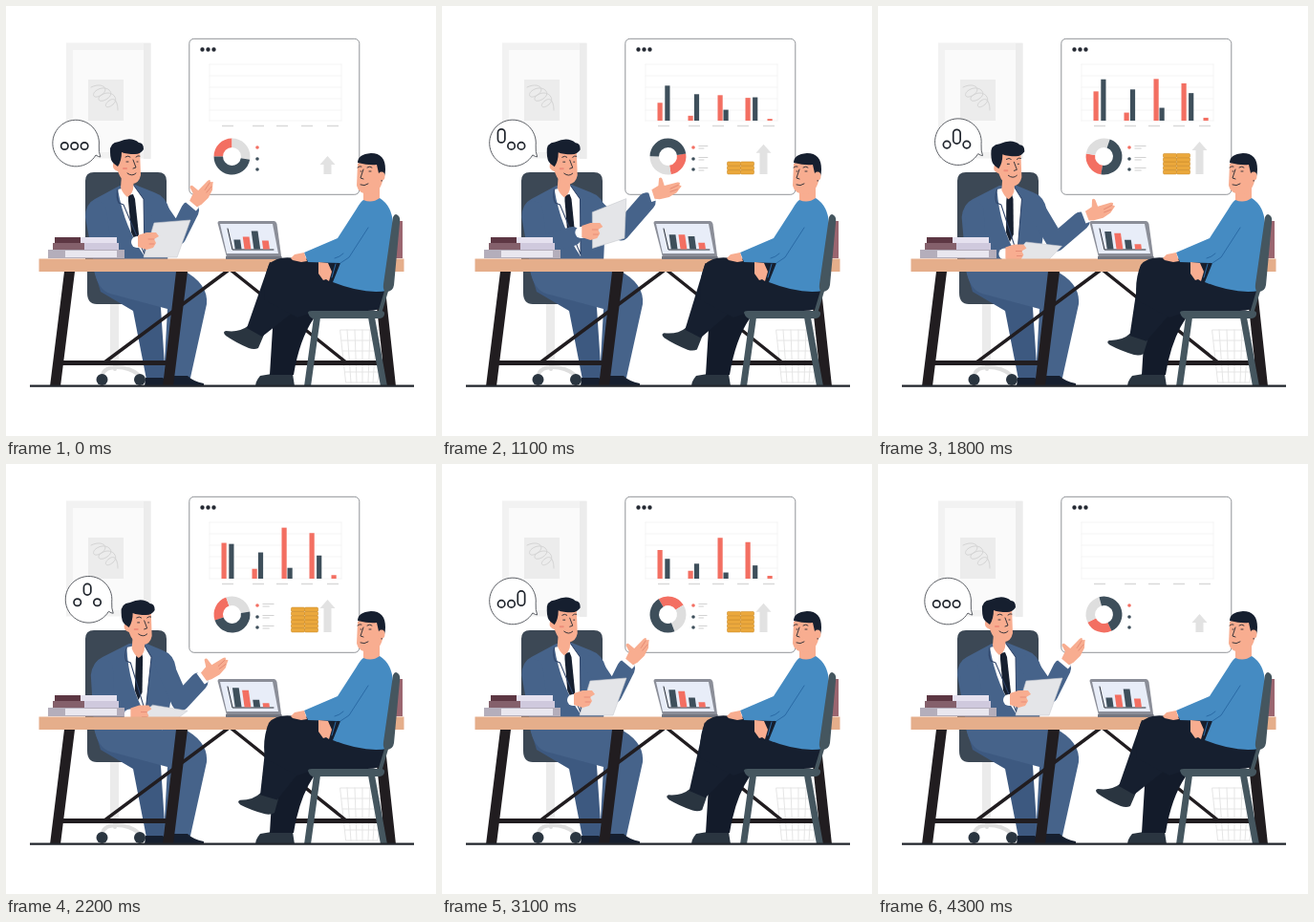
These frames come from a looping animation (450 px wide and 450 px high, 4400 ms). An HTML page:

```html
<!DOCTYPE html>
<html lang="en">
<head>
<meta charset="utf-8">
<title>Business meeting</title>
<style>
html, body { margin: 0; width: 100%; height: 100%; overflow: hidden; background: #fff }
svg { display: block; width: 100vw; height: 100vh }
.line { fill: none; stroke-linecap: round; stroke-linejoin: round }
.ink { stroke: #252a33 }
.suit { stroke: #46638a }
.skin { fill: #f8ad90 }
.navy { fill: #161f2f }
.shoe { fill: #2a3540 }
.red { fill: #f36f62 }
.dark { fill: #3e4f5b }
.steel { fill: #45565f }
.table { fill: #211d20 }
</style>
</head>
<body>
<svg viewBox="0 0 450 450">
  <!-- wall picture -->
  <path fill="#f2f2f2" d="M63 38.500h88.500v121H63z"/>
  <path fill="#fafafa" d="M70 46h74v107H70z"/>
  <path fill="#ececec" d="M144 39h7.500v121H144zM86 77h37v43H86z"/>
  <path class="line" stroke="#d4d4d4" d="M89 85c12-6 20 2 11 8s-12-2-3-6 18 4 9 10-13-1-4-5 17 5 10 11-11 1-4-4 9 4 9 10"/>

  <!-- board -->
  <rect x="191.800" y="34.300" width="178" height="163" rx="5" fill="#fff" stroke="#85888d" stroke-width=".9"/>
  <path class="line ink" stroke-width="4.400" d="M205.500 45.500h0M211.500 45.500h0M217.500 45.500h0"/>
  <path class="line" stroke="#f3f3f3" stroke-width=".8" d="M213 61v59M351 61v59M213 61h138M213 73h138M213 85h138M213 97h138M213 109h138M213 120h138"/>
  <path stroke="#d9d9d9" stroke-width="1.400" d="M226 125.500h12M258 125.500h12M283 125.500h12M309 125.500h12M336 125.500h12"/>
  <g id="bars"></g>
  <g id="donut" fill="none" stroke-width="9.500">
    <circle r="14.200" pathLength="360" stroke="#f36f62" stroke-dasharray="90 270" transform="rotate(180)"/>
    <circle r="14.200" pathLength="360" stroke="#dedede" stroke-dasharray="100 260" transform="rotate(-90)"/>
    <circle r="14.200" pathLength="360" stroke="#3e4f5b" stroke-dasharray="170 190" transform="rotate(10)"/>
  </g>
  <circle class="red" cx="263" cy="148" r="1.800"/><circle class="dark" cx="263" cy="160" r="1.800"/><circle class="dark" cx="263" cy="171" r="1.800"/>
  <path id="legend" stroke="#d2d2d2" stroke-width="1.200"/>
  <path id="arrow" fill="#e2e2e2"/>
  <g id="coins" fill="#eba83c" stroke="#cb8c2b" stroke-width=".6"></g>

  <!-- office chair -->
  <path fill="#ebebeb" d="M109 310h9v62h-9z"/>
  <path class="line" stroke="#dedede" stroke-width="4" d="M114 372v8M101 386q2-8 15-8t23 8"/>
  <g class="shoe"><circle cx="100.500" cy="391" r="6"/><circle cx="140" cy="391" r="6"/></g>
  <path fill="#3c4855" d="M83 183q0-9 9-9h67q9 0 9 9v90H83zM85 276h60v36H95q-10 0-10-12z"/>

  <!-- presenter: legs -->
  <path fill="#3d5980" d="M92 276h60l10 40 5 75h-20l-14-72-34-20z"/>
  <path fill="#46638a" d="M92 276h92q28 14 26 36l-17 77h-28l4-72-60-16q-13-4-17-25z"/>
  <path class="navy" d="M146 389h18l9 9h-28zM173 387h17q6 6 17 8v3h-35z"/>

  <!-- presenter: body -->
  <g id="torso">
    <path fill="#46638a" d="M119 188l16-1 20 8q12 4 16 18l-2 57H92l-9-49q0-14 10-19z"/>
    <path fill="#fff" d="M117 192l17-4 10 14 1 60q-21-30-28-70z"/>
    <path class="navy" d="M128 198l5-1 2 5 4 37-3 8-5-10-3-33z"/>
    <path class="line" stroke="#2e4368" stroke-width="1" d="M117 192q-2 8 1 14l5 2 22 52M134 188l10 14 1 58M100 219l5 34"/>
  </g>
  <g id="head">
    <path class="skin" d="M121 177l13 3-1 12q-2 6-6 8-5-4-7-10z"/>
    <path class="skin" d="M116 153q12-8 24-3l1 27q-2 10-11 9-9-1-13-13-6-2-5-7t5-4z"/>
    <path class="navy" d="M117 168l-4-3q-4-3-4-12-1-10 9-11 13-6 21 1 5 0 5 7-3 5-9 5-9 0-14-2 0 9-4 15z"/>
    <path class="line ink" stroke-width=".9" d="M125 158q3-2 5 0M136 158q2-2 4-1M126 163h2M137 163h1M133 161l3 8-3 1M127 175q5 4 9 0"/>
    <path class="line" stroke="#ee8d7a" stroke-width="2" d="M123 170h3"/>
  </g>
  <path id="armL" class="line suit" stroke-width="20"/>
  <path id="armR" class="line suit" stroke-width="19"/>
  <path id="cuffL" class="line" stroke="#fff" stroke-width="12"/>
  <g id="paperHand">
    <path id="paper" fill="#e4e5e8" stroke="#c9cbd0" stroke-width=".6" d="M7-19L45-22 31 17-4 17z"/>
    <path class="skin" d="M-10-6l9-3 10 0 3 4-5 3 2 4-3 5-7 2-9-3z"/>
    <path class="line" stroke="#df806d" stroke-width=".7" d="M1-2h6M2 3h5"/>
  </g>
  <g id="openHand">
    <path fill="#fff" d="M-4-7h5V7h-5z"/>
    <path class="skin" d="M0-5l8-2 3-7q3-1 3 2l0 7 14 1q4 1 1 3l2 2-3 2-4 3-9 2-10-1-5-2z"/>
    <path class="line" stroke="#df806d" stroke-width=".7" d="M19 0l9-1M18 3l8 0"/>
  </g>

  <!-- speech bubble -->
  <g id="bubble">
    <path fill="#fff" stroke="#4b4f55" stroke-width=".9" d="M94 156a24.300 24.300 0 1 1 3.300-10q-.5 7 1.500 12-2 0-4.800-2z"/>
    <g id="dots" fill="none" stroke="#20252d" stroke-width="1.700"></g>
  </g>

  <!-- books -->
  <path fill="#5d3743" d="M51 242h27v6H51z"/><path fill="#84606b" d="M49 248h33v7H49z"/>
  <path fill="#e5e1ef" d="M78 242h38v6H78z"/><path fill="#cfc9dd" d="M82 248h36v7H82z"/>
  <path fill="#b4aebb" d="M44 255h80v9H44z"/><path fill="#e9e7ef" d="M62 256h54v7H62z"/>
  <path fill="#9b6670" d="M407 225h8v39h-8z"/>

  <!-- waste basket -->
  <path class="line" stroke="#e3e3e3" stroke-width=".9" d="M350 339h45l-6 55h-33zM357 339l4 55M365 339l2 55M373 339v55M381 339l-2 55M388 339l-4 55M351 350h43M352 361h40M354 372h37M355 383h35"/>

  <!-- table -->
  <path class="line" stroke="#211d20" stroke-width="3.500" d="M232 277L103 373M236 277l120 96"/>
  <path class="table" d="M61 278h11L57 398H46zM178 278h12l-15 120h-11zM384 278h11l13 120h-11zM57 371h111v5H57zM302 371h96v5h-96z"/>
  <path fill="#e5ae8b" d="M34.500 264.500h382v13.500h-382z"/>

  <!-- laptop -->
  <path fill="#8b8e98" d="M221.500 227q0-2 2-2h57q2 0 3 3l5 37h-57z"/>
  <path fill="#e8edf8" d="M224 228h55l6 31h-54z"/>
  <path fill="#737680" d="M230 262h58.500v3H230z"/>
  <path class="line ink" stroke-width="1" d="M232 233l5 22h43"/>
  <g id="screen"></g>

  <!-- guest -->
  <path class="shoe" d="M266 387l12-2h22l2 13h-41q0-5 5-11z"/>
  <path fill="#131b2a" d="M284 304l48-9-10 32q-15 22-21 59h-25l4-65z"/>
  <g id="shin">
    <path id="foot" class="shoe" d="M230 340q14 2 23-5l17 9-6 14q-4 2-10 0-14-6-24-13-4-4 0-5z"/>
    <path class="navy" d="M276 268l37 12-2 32-43 34-16-9z"/>
  </g>
  <path class="navy" d="M275 271q8-10 28-7l45 2 48 27v20q-4 6-18 6h-52l-21 7-34-18q-3-20 4-37z"/>
  <path fill="#458bc2" d="M374 203l17-2q13 8 14 27l-6 70q-24 4-57-9l8-20-34-1-4-10 35-15 20-31q4-7 7-9z"/>
  <path class="line" stroke="#2a6aa5" stroke-width="1" d="M379 232l-20 31-9 6M345 270l-4 14M353 259q-4 4-9 5"/>
  <path class="skin" d="M312 258l3 9-6 1-9-2-2-2 4-4zM327 268l10 1 4 9-3 10-3-2-3 1-5-7z"/>
  <path class="skin" d="M374 188l17-2v15q-8 6-17 2z"/>
  <path class="skin" d="M368 165q12-7 24 0l3 14q-3 17-14 18-12 0-14-9z"/>
  <path class="navy" d="M368 164q0-9 14-10 15 0 15 17 0 8-4 13l-3-9-2-9q-8 1-20-2z"/>
  <ellipse class="skin" cx="393" cy="178" rx="3.500" ry="4.500"/>
  <path class="line ink" stroke-width=".9" d="M368 169q2-2 4-1M378 169q3-2 5 0M371 173h1M380 173h2M374 171l-3 9 3 1M371 187q4 2 8-1"/>

  <!-- guest chair -->
  <path class="line" stroke="#45565f" stroke-width="4" d="M399 295l-9 30"/>
  <path class="steel" d="M405 221q2-5 5-2 3 2 2 8l-6 65q-1 7-8 7-4-1-3-8zM316 321q0-2 4-2h72q5 0 4 4-1 4-6 4h-68q-4 0-6-6zM322 326h7l-10 72h-7zM379 326h7l13 72h-7z"/>
  <path stroke="#20242b" stroke-width="2.400" d="M25 397.600h402"/>
</svg>
<script>
const LOOP = 4400, STEP = 100, END = 4300;
const GESTURE = 2800; // length of the presenter's arm movement
const $ = id => document.getElementById(id);
const set = (id, name, value) => $(id).setAttribute(name, value);
const clamp = x => Math.min(1, Math.max(0, x));
const smooth = (from, to, t) => {
  const p = clamp((t - from) / (to - from));
  return p * p * (3 - 2 * p);
};
// Grows from the start, holds, and shrinks to nothing at END.
const swell = (t, rise, fall) => clamp(Math.min(t / rise, (END - t) / fall));
const slow = t => swell(t, 2350, 1600);
const quick = t => swell(t, 1350, 1600);
const early = t => swell(t, 1350, 2600);

function add(parent, name, attrs) {
  const node = document.createElementNS('http://www.w3.org/2000/svg', name);
  for (const key in attrs) node.setAttribute(key, attrs[key]);
  return $(parent).appendChild(node);
}

const makeBar = (color, x, height) => ({
  height, node: add('bars', 'rect', { x, width: 5.2, class: color }), growth: color === 'red' ? slow : early
});
const bars = [
  ...[40, 11, 57, 51, 4].map((h, i) => makeBar('red', 225.5 + [0, 32, 63, 92, 115][i], h)),
  ...[45, 34, 14, 30].map((h, i) => makeBar('dark', 233.3 + 30.6 * i, h))
];
// resting height and change
const screenBars = [[10, 11], [13, 5], [19, -12], [9, -5]].map(([rest, change], i) => ({
  rest, change,
  node: add('screen', 'rect', {
    x: 240 + 9.8 * i, width: 6.8, class: i % 2 ? 'red' : 'dark', transform: 'translate(-36 0) skewX(8)'
  })
}));
const coins = Array.from({ length: 12 }, (_, i) => add('coins', 'rect', {
  x: 298.5 + 14 * (i % 2), y: 171.6 - 4.3 * (i >> 1), width: 14, height: 4.3, rx: 1.2
}));
const dots = [0, 1, 2].map(i => add('dots', 'rect', { x: 57.6 + 10.4 * i, width: 7.4, rx: 3.7 }));

function setBar(node, base, height) {
  node.setAttribute('y', base - height);
  node.setAttribute('height', height);
}

function drawBoard(t) {
  for (const { node, height, growth } of bars) setBar(node, 120, height * growth(t));
  for (const { node, rest, change } of screenBars) setBar(node, 254.5, rest + change * slow(t));

  // The ring turns steadily, with a short rest in the middle.
  const turn = .155 * (Math.min(t, 2300) + Math.max(0, t - 2700));
  set('donut', 'transform', `translate(236.5 157.5) rotate(${turn})`);

  const length = 12 * quick(t);
  set('legend', 'd', [146.5, 158.5, 169.5].map(y => `M268.500 ${y}h${length}m${-length} 2.500h${length * .6}`).join(''));
  const top = 157 - 15 * quick(t);
  set('arrow', 'd', `M336.500 ${top}l8 9h-4V176h-8V${top + 9}h-4z`);
  const rows = Math.round(6 * slow(t));
  coins.forEach((coin, i) => coin.setAttribute('visibility', (i >> 1) < rows ? 'visible' : 'hidden'));
}

function drawPresenter(t, lean) {
  const skew = -Math.atan(lean / 95) * 180 / Math.PI;
  set('torso', 'transform', `translate(0 268) skewX(${skew}) translate(0 -268)`);
  set('head', 'transform', `translate(${lean} ${lean / 4})`);

  // The open hand circles once while the paper is raised, then lowered.
  const phase = 2 * Math.PI * clamp(t / GESTURE);
  const reach = (1 - Math.cos(phase)) / 2, lift = Math.sin(phase);
  const wx = 196 + 28 * reach, wy = 207 - 16 * lift;
  const ex = 179 + 9 * reach, ey = 241 - 8 * lift;
  set('armR', 'd', `M${157 + lean * .7} 209L${ex} ${ey}L${ex + (wx - ex) * .8} ${ey + (wy - ey) * .8}`);
  set('openHand', 'transform', `translate(${wx} ${wy}) rotate(${36 * reach - 50})`);

  const hx = 148 + 9 * lift + 3 * reach, hy = 246 - 16 * lift;
  set('paperHand', 'transform', `translate(${hx} ${hy})`);
  set('paper', 'transform', `scale(1 ${1 + .4 * Math.min(0, lift)}) rotate(${-22 * lift - 4 * reach})`);
  set('armL', 'd', `M${95 + lean * .6} 214L${100 + lean * .3} 251L${hx - 20} ${hy + 5}`);
  set('cuffL', 'd', `M${hx - 11} ${hy + 1}h1`);
}

function drawBubble(t, lean) {
  set('bubble', 'transform', `translate(${lean * 1.15} ${-lean * .15})`);
  // The dots hop one after another and stretch while moving.
  dots.forEach((dot, i) => {
    const p = clamp((t - 100) / 1400 - i);
    const stretch = Math.min(1, p * 14, (1 - p) * 14);
    const half = 3.7 + (2.1 + 2 * Math.abs(Math.cos(Math.PI * p))) * stretch;
    setBar(dot, 146.5 - 13.5 * Math.sin(Math.PI * p) + half, 2 * half);
  });
}

function drawGuest(t) {
  const swing = 13 * smooth(700, 2200, t) * (1 - smooth(2700, 3500, t));
  set('shin', 'transform', `rotate(${-swing} 300 280)`);
  set('foot', 'transform', `rotate(${swing * .4} 258 340)`);
}

const start = performance.now();
function frame() {
  const t = Math.floor((performance.now() - start) % LOOP / STEP) * STEP;
  const lean = 12 * Math.exp(-(((t - 2100) / 600) ** 2));
  drawBoard(t);
  drawPresenter(t, lean);
  drawBubble(t, lean);
  drawGuest(t);
  requestAnimationFrame(frame);
}
frame();
</script>
</body>
</html>
```
